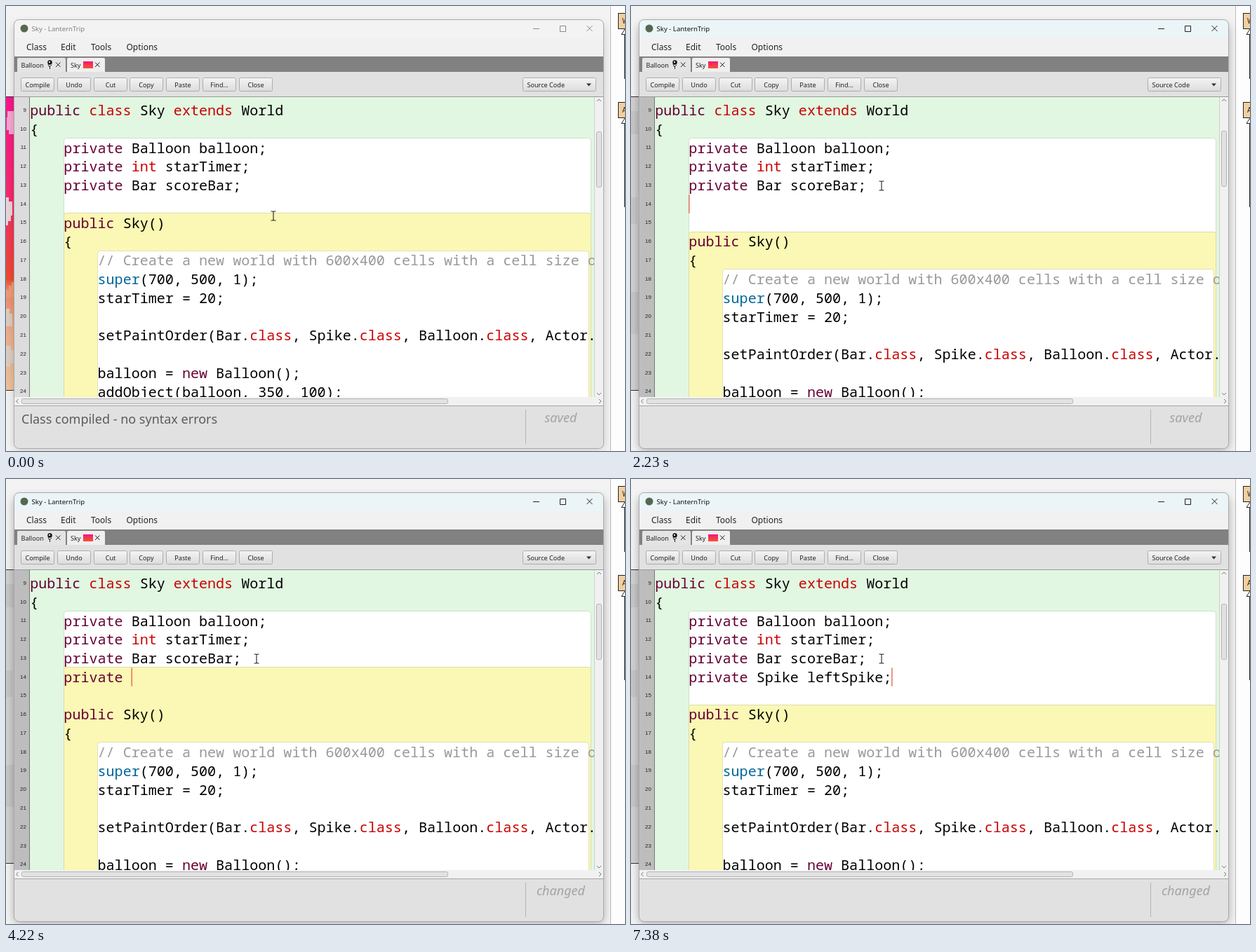
Animation, 882 px wide and 635 px high, one loop 8000 ms. Source, as an HTML page:

```html
<!DOCTYPE html>
<html lang="en">
<head>
<meta charset="utf-8">
<title>Code editor</title>
<style>
  html, body { margin: 0; width: 100%; height: 100%; overflow: hidden; background: #f2f2f2; }
  svg { display: block; width: 882px; height: 635px; }
  text { font-family: "Noto Sans", "Open Sans", sans-serif; white-space: pre; }
  .code text { font: 20.07px "Noto Sans Mono", "DejaVu Sans Mono", monospace; }
  .numbers text { font: 8px "Liberation Sans", sans-serif; text-anchor: end; fill: #222; }
  .menu text { font-size: 12px; fill: #222; }
  .small text { font-size: 9.1px; fill: #222; }
  .state { font-size: 18px; font-style: italic; text-anchor: middle; fill: #a3a3a3; }
  .line { fill: none; stroke: #222; }
</style>
</head>
<body>
<svg viewBox="0 0 882 635">
  <defs>
    <linearGradient id="sky" x2="0" y2="1">
      <stop offset="0" stop-color="#fb148f"/>
      <stop offset=".35" stop-color="#f72a6c"/>
      <stop offset=".62" stop-color="#ee4a31"/>
      <stop offset=".66" stop-color="#ee8a66"/>
      <stop offset=".8" stop-color="#ecae8b"/>
      <stop offset="1" stop-color="#edc29c"/>
    </linearGradient>
    <linearGradient id="thumbSky" x2="0" y2="1">
      <stop offset="0" stop-color="#f8157f"/><stop offset="1" stop-color="#f4562c"/>
    </linearGradient>
    <linearGradient id="button" x2="0" y2="1">
      <stop offset="0" stop-color="#f4f4f4"/><stop offset="1" stop-color="#dcdcdc"/>
    </linearGradient>
    <filter id="shadow" x="-10%" y="-10%" width="120%" height="120%">
      <feGaussianBlur stdDeviation="7"/>
    </filter>
    <clipPath id="pane"><rect x="12" y="130" width="827" height="428"/></clipPath>
    <clipPath id="frame"><rect x="12" y="20" width="839" height="611" rx="6"/></clipPath>
  </defs>

  <!-- desktop behind the window -->
  <rect width="882" height="635" fill="#f3f3f3"/>
  <rect x="862" width="20" height="635" fill="#fdfdfd"/>
  <path d="M861.5 0V635" stroke="#bcbcbc"/>
  <rect y="130" width="14" height="418" fill="url(#sky)"/>
  <path d="M2 150h10v33h-8v-6h-3v-18h1z" fill="#f9a5d2"/>
  <path d="M0 273h4v6h5v20h-2v8h-4v6h-3z" fill="#ead6da"/>
  <path d="M0 405h4v-6h4v-5h4v22h-12z" fill="#ee9a78"/>
  <path d="M0 432h5v7h4v18h-9zM0 485h7v6h4v19h-5v5h-6z" fill="#dccdc0"/>
  <g id="greyWorld">
    <rect y="130" width="14" height="418" fill="#d2d2d2"/>
    <path d="M0 150h12v33h-12zM0 273h9v38h-9zM0 408h12v60h-12z" fill="#c8c8c8"/>
  </g>
  <path d="M0 129.5H14M0 548.5H14" stroke="#333"/>
  <g id="classes"></g>
  <rect x="12" y="26" width="839" height="606" rx="6" opacity=".2" filter="url(#shadow)"/>
  <rect id="deepShadow" x="12" y="28" width="839" height="607" rx="6" filter="url(#shadow)"/>

  <g clip-path="url(#frame)">
    <rect x="12" y="20" width="839" height="611" fill="#e1e1e1"/>
    <rect x="12" y="20" width="839" height="25" fill="#f3f3f3"/>
    <rect id="activeBar" x="12" y="20" width="839" height="25" fill="#ebf5f8"/>
    <rect x="12" y="45" width="839" height="27" fill="#f1f1f1"/>
    <rect x="12" y="72" width="839" height="22" fill="#818181"/>
    <path d="M16 94V76q0-2 2-2H83q2 0 2 2V94z" fill="#e4e4e4"/>
    <path d="M87 94V76q0-2 2-2H139q2 0 2 2V94z" fill="#efefef"/>
  </g>

  <circle cx="26" cy="32" r="5.5" fill="#56684f"/>
  <g id="titleBar">
    <text x="36.5" y="36" font-size="9.6" fill="#111">Sky - LanternTrip</text>
    <path class="line" d="M751 32.5h9M789.5 28.5h8v8h-8zM827.5 28l8 8m0-8l-8 8"/>
  </g>

  <g class="menu">
    <text x="29" y="63">Class</text><text x="78" y="63">Edit</text>
    <text x="121" y="63">Tools</text><text x="171.5" y="63">Options</text>
  </g>

  <g class="small" id="controls">
    <text x="21.5" y="87.5">Balloon</text><text x="92" y="87.5">Sky</text>
    <circle cx="62.5" cy="80.5" r="3.2" fill="#111"/>
    <path d="M60 83l2 4 3-3M62.5 86v4" class="line"/>
    <rect x="61" y="79" width="2" height="2" fill="#eee"/>
    <rect x="110" y="79" width="14" height="10" fill="url(#thumbSky)"/>
    <path class="line" d="M71 80.5l6.5 6.5m0-6.5l-6.5 6.5M127 80.5l6.5 6.5m0-6.5l-6.5 6.5"/>
  </g>

  <!-- editor -->
  <g clip-path="url(#pane)">
    <rect x="12" y="130" width="827" height="428" fill="#e1f7e1"/>
    <rect id="gutter" x="12" y="130" width="21" height="428"/>
    <path d="M33.5 130V558" stroke="#777"/>
    <rect x="82.5" y="188.5" width="751" height="400" rx="4" fill="#fff" stroke="#c9e3c9"/>
    <rect id="method" x="82.5" width="751" height="400" rx="3" fill="#faf8b4" stroke="#dcdcae"/>
    <rect id="body" x="130.5" width="700" height="400" rx="4" fill="#fff" stroke="#e2e0b8"/>
    <g class="numbers" id="numbers"></g>
    <g class="code" id="code"></g>
    <rect id="caret" width="1.2" height="26.5" fill="#e0523f"/>
  </g>
  <path d="M12 129.5H851" stroke="#9a9a9a"/>

  <!-- scroll bars and status area -->
  <rect x="838" y="130" width="13" height="428" fill="#f1f1f1"/>
  <path d="M838.5 130V558" stroke="#cfcfcf"/>
  <rect id="scroll" x="841.5" width="7" height="79" rx="2" fill="#e2e2e2" stroke="#b4b4b4"/>
  <rect x="12" y="558" width="839" height="12" fill="#f1f1f1"/>
  <rect x="22.5" y="560.5" width="607" height="7" rx="2" fill="#e2e2e2" stroke="#b4b4b4"/>
  <path d="M842 136l3-3 3 3M842 552l3 3 3-3M17.500 561l-3 3 3 3M845 561l3 3-3 3" fill="none" stroke="#777"/>
  <path d="M12 570.500H851" stroke="#a4a4a4"/>
  <path d="M740.5 576V625" stroke="#b3b3b3"/>
  <text id="message" x="22" y="595.500" font-size="18" fill="#5c5c5c">Class compiled - no syntax errors</text>
  <text id="state" class="state" x="790.5" y="594"></text>
  <rect x="11.500" y="19.5" width="840" height="612" rx="7" fill="none" stroke="#a9a9a9"/>

  <path id="mouse" d="M-3.500-6.500h2.500l1 1 1-1h2.500M0-5.500v11M-3.500 6.500h2.500l1-1 1 1h2.500" fill="none" stroke="#222" stroke-width="1.1"/>
</svg>

<script>
const LOOP = 8000, ROW = 26.77, TOP = 189, LEFT = 34.2, CHAR = 12.042;
const $ = id => document.getElementById(id);
const rowTop = n => TOP + (n - 11) * ROW;
const clamp = v => Math.max(0, Math.min(1, v));

function add(parent, tag, attrs, text = "") {
  const node = document.createElementNS("http://www.w3.org/2000/svg", tag);
  for (const key in attrs) node.setAttribute(key, attrs[key]);
  node.textContent = text;
  parent.append(node);
  return node;
}

const FIRST_ROW = 8;
const LINES = [
  " */",
  "public class Sky extends World",
  "{",
  "    private Balloon balloon;",
  "    private int starTimer;",
  "    private Bar scoreBar;",
  "",
  "    public Sky()",
  "    {",
  "        // Create a new world with 600x400 cells with a cell size of 1x1 pixels.",
  "        super(700, 500, 1);",
  "        starTimer = 20;",
  "",
  "        setPaintOrder(Bar.class, Spike.class, Balloon.class, Actor.class);",
  "",
  "        balloon = new Balloon();",
  "        addObject(balloon, 350, 100);"
];
const TYPED = "private Spike leftSpike;";
const KEY_TIMES = [
  3070, 3200, 3340, 3530, 3680, 3860, 4040, 4220, 4780, 4970, 5170, 5350,
  5480, 5680, 5860, 5980, 6100, 6320, 6680, 6780, 6960, 7100, 7250, 7380
];
const MOUSE = [
  [0, 381, 299.5], [70, 377, 291], [110, 372, 280], [150, 368, 271],
  [190, 365, 264], [230, 362.5, 260], [480, 359, 258], [510, 357, 256.5]
];

const WORDS = /\b(private|public|new|class|extends|int|super)\b/;
function tokenColor(word) {
  if (/^(private|public|new)$/.test(word)) return "#660033";
  if (/^(class|extends|int)$/.test(word)) return "#cc0000";
  return word === "super" ? "#006699" : "#000";
}

function drawCode(lines) {
  $("code").replaceChildren();
  lines.forEach((line, i) => {
    const text = line.trimStart();
    const x = LEFT + (line.length - text.length) * CHAR;
    const row = add($("code"), "text", { x, y: rowTop(FIRST_ROW + i) + 20.6 });
    const comment = /^(\/\/|\*)/.test(text);
    const parts = comment ? [text] : text.split(WORDS);
    for (const part of parts)
      if (part) add(row, "tspan", { fill: comment ? "#999" : tokenColor(part) }, part);
  });
}

function drawStatics() {
  for (let n = 9; n <= 24; n++)
    add($("numbers"), "text", { x: 29, y: rowTop(n) + 15.3 }, n);

  const controls = $("controls");
  const button = (x, width) => add(controls, "rect", {
    x, y: 102.5, width, height: 19, rx: 2, fill: "url(#button)", stroke: "#adadad"
  });
  ["Compile", "Undo", "Cut", "Copy", "Paste", "Find...", "Close"].forEach((label, i) => {
    const x = Math.round(22 + i * 51.8) - 0.5;
    button(x, 47);
    add(controls, "text", { x: x + 23.5, y: 115.5, "text-anchor": "middle" }, label);
  });
  button(736.5, 104);
  add(controls, "text", { x: 742.5, y: 115.5 }, "Source Code");
  add(controls, "path", { d: "M827 110.500h7l-3.500 4z", fill: "#333" });

  for (const [y, letter, end] of [[10, "W", 104], [137, "A", 287]]) {
    const group = $("classes");
    add(group, "rect", { x: 872.5, y: y + .5, width: 20, height: 22, fill: "#f3cf9f", stroke: "#222" });
    add(group, "text", { x: 878, y: y + 15, "font-size": 10, fill: "#222" }, letter);
    add(group, "path", { class: "line", d: `M882 ${y + 23}L877 ${y + 30.5}H882M881.5 ${y + 31}V${end}` });
  }
}

let shown = -2;
function render(t) {
  const entered = t >= 2090;
  const settled = t >= 2180;
  const count = KEY_TIMES.filter(time => t >= time).length;
  const compiled = !entered || (t >= 2510 && t < 3070);
  const saved = !entered || (t >= 2230 && t < 3070);

  const version = entered ? count : -1;
  if (version !== shown) {
    shown = version;
    const lines = LINES.slice();
    if (entered) {
      lines.splice(6, 0, "    " + TYPED.slice(0, count));
      lines.pop();
    }
    drawCode(lines);
  }

  const methodRow = !settled ? 15 : t >= 4040 && t < 4780 ? 14 : 16;
  $("method").setAttribute("y", Math.round(rowTop(methodRow)) - 0.5);
  $("body").setAttribute("y", Math.round(rowTop(settled ? 18 : 17)) - 0.5);
  $("scroll").setAttribute("y", entered ? 178.5 : 179.5);
  $("gutter").setAttribute("fill", compiled ? "#dcdcdc" : "#bdbdbd");

  const column = 4 + (settled ? count : 21);
  $("caret").setAttribute("x", LEFT + column * CHAR - 0.1);
  $("caret").setAttribute("y", rowTop(settled ? 14 : 13));
  $("caret").style.opacity = t >= 890 ? 1 : 0;

  const active = clamp((t - 890) / 200);
  $("activeBar").style.opacity = active;
  $("titleBar").style.opacity = 0.5 + 0.5 * active;
  $("deepShadow").style.opacity = 0.14 * active;
  $("greyWorld").style.opacity = t >= 2230 ? 1 : 0;
  $("message").style.opacity = compiled ? 1 : 0;
  $("state").textContent = saved ? "saved" : "changed";

  const [, x, y] = MOUSE.findLast(step => t >= step[0]);
  $("mouse").setAttribute("transform", `translate(${x} ${y})`);
}

drawStatics();
const start = performance.now();
function tick() {
  render((performance.now() - start) % LOOP);
  requestAnimationFrame(tick);
}
tick();
</script>
</body>
</html>
```
